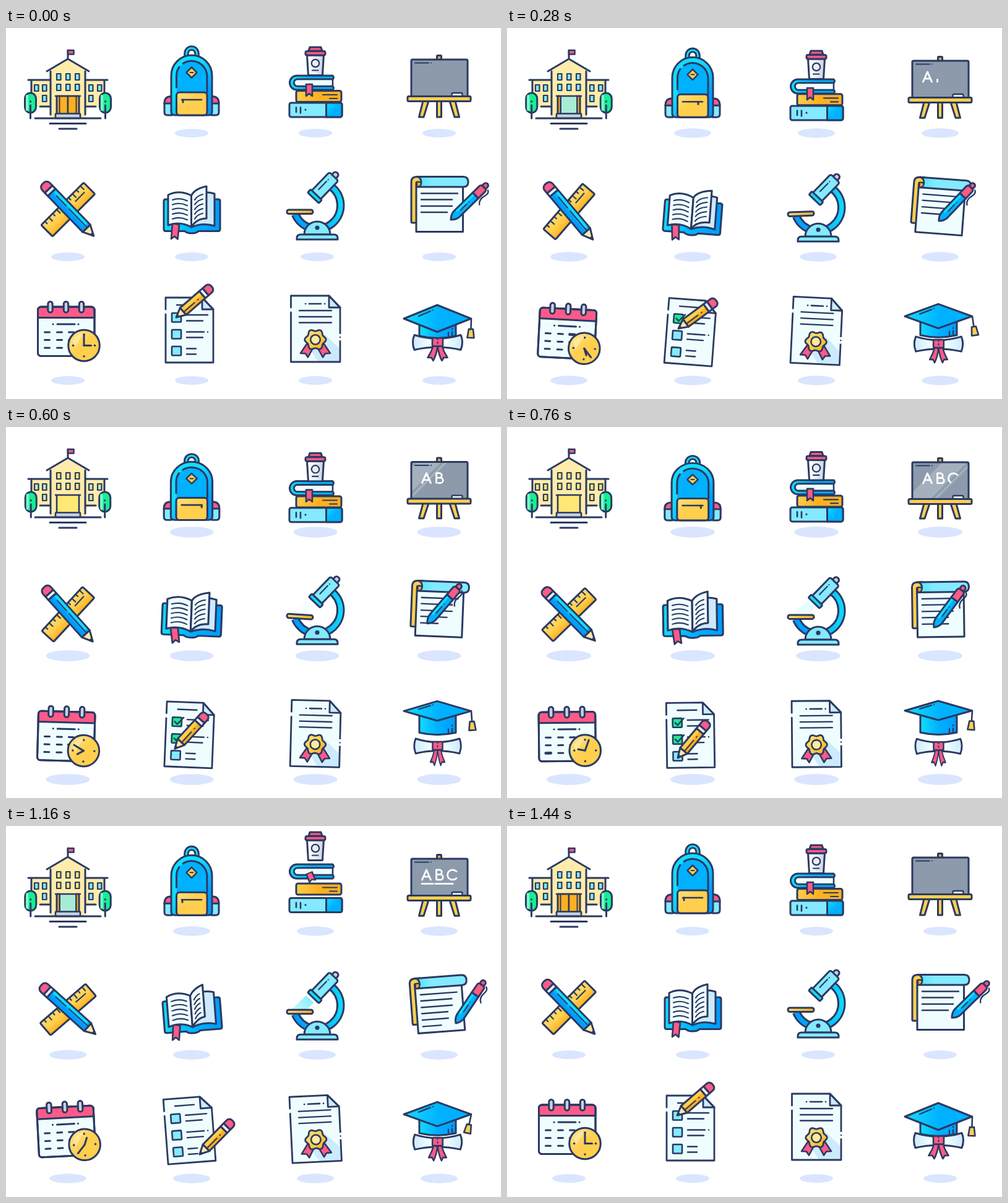
These frames come from a looping animation (800 by 600 pixels, 1.48 s). An HTML page with a canvas:

```html
<!DOCTYPE html>
<html lang="en">
<meta charset="utf-8">
<title>School icons</title>
<style>
  html, body { margin: 0; width: 100%; height: 100%; overflow: hidden; background: #fff; }
  canvas { display: block; }
</style>
<canvas width="800" height="600"></canvas>
<script>
const c = document.querySelector('canvas').getContext('2d');
const INK = '#2b3a62', BLUE = '#00b1ff', DEEP = '#009cff', CYAN = '#12dcff', ICE = '#84eaff',
  PAPER = '#f0fdff', SHADE = '#cdeafd', PINK = '#ff5a87', GOLD = '#ffcf4d', ORANGE = '#ffb020',
  CREAM = '#ffecaa', GREY = '#c7d2e0', PALE = '#e9eef7', GREEN = '#16ee95';
const LOOP = 1480, CYCLE = 1440, TIMES = [0, 280, 440, 760, 1000, 1160, CYCLE];
let t, u, s; // time, bob 0..1, sway -1..1

const clamp = x => Math.max(0, Math.min(1, x));
const ramp = (a, b) => clamp((t - a) / (b - a));

// Smooth periodic curve through one value per entry of TIMES
function key(...v) {
  const n = v.length, at = i => TIMES[(i + n) % n] + CYCLE * Math.floor(i / n), val = i => v[(i + n) % n];
  const slope = i => (val(i + 1) - val(i - 1)) / (at(i + 1) - at(i - 1));
  let i = n - 1;
  while (TIMES[i] > t) i--;
  const h = at(i + 1) - at(i), x = (t - at(i)) / h, y = 1 - x;
  return val(i) * y * y * (1 + 2 * x) + val(i + 1) * x * x * (3 - 2 * x)
    + h * x * y * (slope(i) * y - slope(i + 1) * x);
}

function draw(p, fill, width = 3, color = INK) {
  if (typeof p === 'string') p = new Path2D(p);
  if (fill) { c.fillStyle = fill; c.fill(p); }
  if (width) { c.lineWidth = width; c.strokeStyle = color; c.stroke(p); }
}
const line = (d, width = 3, color) => draw(d, null, width, color);
const flat = (d, fill) => draw(d, fill, 0);
function box(x, y, w, h, r, fill, width) {
  const p = new Path2D();
  p.roundRect(x, y, w, h, r);
  draw(p, fill, width);
}
function disc(x, y, r, fill, width = 0) {
  const p = new Path2D();
  p.arc(x, y, r, 0, 7);
  draw(p, fill, width);
}
function blend(x1, y1, x2, y2, ...colors) {
  const g = c.createLinearGradient(x1, y1, x2, y2);
  colors.forEach((col, i) => g.addColorStop(i / (colors.length - 1), col));
  return g;
}
function place(x, y, deg, fn, sx = 1, sy = 1) {
  c.save();
  c.translate(x, y);
  c.rotate(deg * Math.PI / 180);
  c.scale(sx, sy);
  fn();
  c.restore();
}
// Moves a drawing made in stage coordinates around its pivot
const pose = (x, y, dy, deg, fn, sx, sy) =>
  place(x, y + dy, deg, () => { c.translate(-x, -y); fn(); }, sx, sy);
function fade(a, fn) {
  c.save();
  c.globalAlpha = clamp(a);
  fn();
  c.restore();
}
function shadow(x, y) {
  c.fillStyle = '#dae5ff';
  c.beginPath();
  c.ellipse(x, y, 27 + 9 * u, 7 + 2 * u, 0, 0, 7);
  c.fill();
}

// Tip at the origin, body along +x
function pencil(len, h, body, light) {
  const tip = h * 2;
  draw(`M0 0L${tip} ${-h}V${h}Z`, '#ffe9a6');
  flat(`M0 0L${tip * .35} ${-h * .35}V${h * .35}Z`, INK);
  box(tip, -h, len - tip - 20, h * 2, 0, body, 0);
  box(tip, -h, len - tip - 20, h * .9, 0, light, 0);
  line(`M${tip + 2} ${h * .2}H${len * .5}M${len * .5 + 7} ${h * .2}H${len - 30}`, 2);
  box(tip, -h, len - tip - 20, h * 2, 0);
  box(len - 20, -h, 7, h * 2, 0, PALE);
  box(len - 13, -h, 13, h * 2, [0, h * .8, h * .8, 0], PINK);
}

function school() {
  const night = key(0, 0, 1, 1, 1, 1), late = key(0, 0, 0, 1, 1, 0), YELLOW = '#ffe873';
  const panes = (lit, list) => list.forEach(([x, y]) => {
    box(x, y, 6.5, 10, 0, ICE, 0);
    fade(lit, () => box(x, y, 6.5, 10, 0, YELLOW, 0));
    box(x, y, 6.5, 10, 0, null, 2.2);
  });
  flat('M42 84H158V127H42Z', CREAM);
  flat('M72 68L100 52L128 68V146H72Z', CREAM);
  line('M41 103V84M36 84H71M129 84H164M159 84V103M55 127H71M129 127H145M72 70V140M128 70V140');
  line('M66 70L100 50L134 70M100 49V36');
  box(100, 36, 9.5, 6.5, 0, PINK, 2.5);
  panes(night, [82, 97, 112].flatMap(x => [[x, 74], [x, 91]]));
  panes(late, [[46, 92], [59, 92], [59, 109], [134, 92], [148, 92], [134, 109]]);
  box(82, 110, 36, 29, 0, '#a8ebd5', 0);
  fade(key(0, 0, 1, 1, 1, 0), () => box(82, 110, 36, 29, 0, YELLOW, 0));
  const leaf = 14 * clamp(1 - key(0, .95, 1, 1, 1, .95));
  if (leaf > .3) {
    const w = leaf + 4;
    box(82, 110, w, 29, 0, ORANGE, 2.5);
    box(118 - w, 110, w, 29, 0, ORANGE, 2.5);
    if (leaf > 5) line('M86.5 111V138M113.5 111V138', 2);
  }
  line('M82 138V110H118V138M80 110H120', 2.6);
  box(80, 138.5, 40, 7.5, 1, GREY, 2.6);
  line('M47 146H153M71 154.5H129M86 163H114');
  for (const side of [-1, 1]) place(100 + side * (60.5 - .8 * u), 0, 0, () => {
    box(-9, 105, 18, 32, 9, GREEN);
    box(-7.5, 108, 4, 26, 2, '#7bffc8', 0);
    line('M0 118.5V119M0 125V146');
  });
}

function backpack() {
  const sy = key(1, 1, 1, .955, 1.055, 1);
  pose(300, 142, 10 * u, 0, () => {
    place(0, key(0, 0, 0, 2, -1, 0), 0, () => {
      const handle = 'M291.5 49V41A8.5 8.5 0 0 1 308.5 41V49';
      line(handle, 8.5);
      line(handle, 2.8, CYAN);
    });
    for (const side of [-1, 1]) place(300, 0, 0, () => {
      draw('M-32 111H-36Q-44 112 -44 122V136Q-44 141 -39 141H-32Z', ICE);
      draw('M-32 111H-36Q-44 112 -44 122H-32Z', PINK);
    }, -side, 1);
    draw('M267 135V77A33 33 0 0 1 333 77V135Q333 141 327 141H273Q267 141 267 135Z',
      blend(267, 50, 333, 100, CYAN, CYAN, DEEP));
    flat('M276 140V78A24.5 24.5 0 0 1 325 78V140Z', BLUE);
    line('M275.5 96V78Q275.5 69 280 63M286 57.5A25 25 0 0 1 325 78V104');
    draw('M300 63.5L308.5 72L300 80.5L291.5 72Z', GOLD, 2.5);
    line('M297.5 72H302.5', 2);
    box(275.5, 104, 49.5, 37, 5, blend(280, 105, 300, 141, '#ffe07c', GOLD, GOLD));
    line('M284 116H316', 2.6);
    line(`M${key(286, 309, 315, 313, 292, 285)} 116v4`);
  }, 1 + (1 - sy) * .6, sy);
}

function books() {
  const y = 10 * u;
  const lift = (...v) => key(...v) + y;
  place(0, lift(0, 1.7, 1, -1, -7.7, -7.8), 0, () => {
    box(458, 121, 85, 23, 3, ICE);
    box(517.5, 121, 25.5, 23, [0, 3, 3, 0], blend(518, 121, 543, 144, CYAN, BLUE, BLUE));
    line('M469 128.5V136M476 128.5V137.5', 2.6);
    line('M484 132V132.3');
  });
  place(0, lift(0, 2, 1.3, -.5, -12.2, -11.8), 0, () => {
    box(469, 101.5, 73, 18, 3, blend(469, 102, 542, 119, GOLD, ORANGE, ORANGE));
    line('M512 108H535M523 114H535', 2.2);
  });
  place(0, lift(0, 2.7, 1.3, -1, -18.7, -18.3), 0, () => {
    draw('M528 77H470A11.5 11.5 0 0 0 470 100H528Q531 97 528 94H471A5.5 5.5 0 0 1 471 83H528Q531 80 528 77Z',
      blend(460, 0, 530, 0, CYAN, BLUE, BLUE));
    draw('M528 83H471A5.5 5.5 0 0 0 471 94H528Z', PAPER, 2.6);
    place(490, 91, key(0, 0, 0, 0, 0, -22), () =>
      draw('M-5 0V19L0 15L5 19V0Z', PINK, 2.6), 1, key(1, 1, 1, 1, .85, .75));
  });
  place(0, lift(0, 2.7, 1.3, -.5, -24.7, -24.3), 0, () => {
    draw('M486.5 44H513.5L511.5 76.5H488.5Z', blend(487, 0, 513, 0, '#fff', PALE, GREY));
    draw('M491 31H509L511 37H489Z', PINK);
    box(484, 37.5, 32, 6.5, 2.5, PINK);
    disc(500, 57, 6.2, PALE, 2.2);
    line('M495 68.5H504.5', 2.2);
  });
}

function trace(d, len, a, b) {
  const k = ramp(a, b);
  if (!k) return;
  c.setLineDash([len * k, 999]);
  line(d, 2.8, '#fff');
  c.setLineDash([]);
}

function board() {
  place(0, 6 * u, 0, () => {
    const leg = 144 - 2 * u;
    for (const k of [-1, 1])
      draw(`M${700 + k * 17} 118H${700 + k * 26}L${700 + k * 32.5} ${leg}H${700 + k * 25}Z`, GOLD);
    box(696.5, 118, 7, leg - 118, 0, GOLD);
    box(696.5, 44.5, 7, 8, 1, ORANGE);
    box(655, 51, 91, 60, 2, '#8c9aab', 0);
    c.save();
    c.beginPath();
    c.rect(655, 51, 91, 60);
    c.clip();
    const d = 700 + (t - 440) * .25;
    if (t > 240 && t < 1200) for (const [a, b] of [[-25, 15], [20, 25]])
      flat(`M${d + a - 51} 51H${d + b - 51}L${d + b - 111} 111H${d + a - 111}Z`, '#ffffff38');
    c.restore();
    line('M661 56.5H683M687 56.5V56.6', 2);
    fade(1 - ramp(1200, 1400), () => {
      trace('M672.5 85L679.5 69L686.5 85M675 80H684', 36, 80, 260);
      trace('M695.5 85V69H700.5A3.75 3.75 0 0 1 700.5 76.5H695.5H702A4.25 4.25 0 0 1 702 85H695.5', 64, 260, 620);
      trace('M728 71.5Q725 69 721.5 69A8 8 0 0 0 721.5 85Q725.5 85 728 82.5', 39, 620, 820);
      trace('M672 91.5H690', 18, 820, 900);
      trace('M693.5 91.5H722', 29, 900, 1000);
    });
    box(655, 51, 91, 60, 2);
    box(720.5, 105, 17, 6, 2, PALE, 2.4);
    box(649, 110.5, 102, 8, 2, GOLD);
  });
}

function tools() {
  place(100.3, 293.6 + 10 * u, -45 - 4.4 * s, () => {
    box(-48.5, -13, 97, 26, 2, blend(0, -13, 0, 13, '#ffdc70', GOLD, ORANGE));
    for (let i = 0; i < 10; i++) line(`M${i * 9 - 40} -13v${i % 2 ? 8 : 5}`, 2.2);
    line('M18 -1H38', 2.2);
  });
  place(101.5, 294.5 + 10 * u, 226 + 4.2 * s, () => {
    c.translate(-58, 0);
    pencil(118, 8.5, BLUE, DEEP);
    box(22, 3, 73, 4, 0, CYAN, 0);
  });
}

function openBook() {
  pose(300, 295, 10 * u, 4.7 * s, () => {
    draw('M258 277H343Q346 277 346 280V325Q346 328.5 343 328.5H311Q308 332 300 332Q292 332 289 328.5H258Q255 328.5 255 325V280Q255 277 258 277Z',
      blend(255, 0, 346, 0, CYAN, BLUE, DEEP));
    place(274.5, 318, key(0, -10, -12, -12, -2, 2), () =>
      draw('M-5.5 -2L-7.5 23L-2 19L3 23.5L5.5 0Z', PINK, 2.6));
    draw('M300 272Q318 262 337 268V320Q318 314 300 322Z', SHADE);
    draw('M262 270Q280 261 299.5 271V322Q281 312 262 319Z', PAPER);
    for (let i = 0; i < 5; i++) line(`M269 ${278 + i * 7.7}q12 -4.5 24 1.5`, 2.1);
    const x = 324 + 4 * s, y = 256 + 1.5 * s;
    draw(`M299.5 271Q305 260 ${x} ${y}V${y + 52}Q308 308 299.5 322Z`, PAPER);
    for (let i = 0; i < 5; i++) line(`M305 ${278 + i * 7.7}q4 -7 ${x - 311} -9`, 2.1);
  }, 1 + .06 * u, 1 - .02 * u);
}

function microscope() {
  place(0, 10 * u, 0, () => {
    fade(key(0, 0, 0, .25, 1, 1), () =>
      flat('M485 271L497 282L486 295H460Z', blend(490, 275, 472, 297, '#8aefff', '#c9f7ff')));
    const arm = 'M524.5 255.7A38 38 0 1 1 467.5 301';
    c.lineCap = 'butt';
    line(arm, 13.5);
    line(arm, 7.5, blend(465, 0, 547, 0, DEEP, BLUE, CYAN));
    c.lineCap = 'round';
    place(475, 297.2, key(0, -2, 6, 0, 0, 0), () =>
      box(-21, -3.2, 42, 6.5, 3, blend(-21, 0, 21, 0, '#ffdd74', ORANGE)));
    draw('M482 334A21 21 0 0 1 524 334Z', ICE);
    disc(503, 323, 3.6, INK);
    draw('M470 342V340Q470 334 476 334H530Q536 334 536 340V342Z', ICE);
    place(516 + key(0, .5, 4, -.5, 0, 0), 254.5 - key(0, 0, 1, 0, 0, 0), -46, () => {
      box(18, -4.5, 10, 9, [0, 4, 4, 0], GREY);
      box(-22, -10, 42, 20, 3, ICE);
      box(-28, -12.5, 7, 25, 2, CYAN);
      line('M-12 -3H6M10 -3H10.1', 2.2);
    });
  });
}

function notepad() {
  pose(700, 285, 10 * u, 4.6 * s, () => {
    draw('M655 314V249Q655 240.5 664 240.5H672V314Q672 315 670 315H656Z', GOLD);
    draw('M663 250H738.5V329.5H663Z', PAPER);
    draw('M664 240.5H739Q747 240.5 747 249Q747 257 739 257H664Q672 254 671 248Q670 241 664 240.5Z',
      blend(664, 0, 690, 0, '#4fe2ff', ICE));
    draw('M664 257V249Q671 248 671 252Q670 257 664 257Z', ORANGE, 2.4);
    line('M671 267.5H730M671 277.5H721M671 288H721M671 298H713', 2.4);
    const wipe = 1 - ramp(1200, 1400);
    const row = (y, w, a, b) => fade(wipe, () => { if (t > a) line(`M671 ${y}H${671 + w * ramp(a, b)}`, 2.4); });
    row(308.5, 42, 400, 700);
    row(319, 30, 760, 960);
  });
  place(key(719, 698, 677, 690, 702, 727), key(310, 312, 311, 324, 323, 319),
    key(-44.5, -46.4, -46, -53.5, -59.5, -56), () => {
      line('M76 8Q74 13 66 11Q55 8 50 15', 2.4);
      draw('M0 0Q6 -6 13 -6.5H56V6.5H13Q6 6 0 0Z', BLUE);
      box(16, -5, 38, 3.5, 0, CYAN, 0);
      line('M22 0H36M41 0H41.1', 2);
      box(56, -6.5, 19, 13, [0, 4, 4, 0], PINK);
      box(75, -4, 8, 8, [0, 4, 4, 0], PINK);
    });
}

function calendar() {
  pose(97, 490, 10 * u, 3.1 * s, () => {
    box(51.5, 451, 91.5, 79.5, 5, PAPER);
    flat('M120 530L143 495V530Z', SHADE);
    box(51.5, 451, 91.5, 17.5, [5, 5, 0, 0], PINK);
    box(51.5, 451, 91.5, 79.5, 5);
    for (const x of [71.5, 97, 122]) box(x - 3.7, 442.5, 7.4, 17.5, 3.7, GREY);
    line('M76 479H76.1M83 479H111M117 479H117.1');
    for (let i = 0; i < 9; i++) {
      const x = [62.5, 82.5, 101.5][i % 3], y = 492 + Math.floor(i / 3) * 12.6;
      line(`M${x} ${y}h8`, t >= 115 && Math.floor(t / 115) === i ? 4.6 : 3);
    }
    disc(126, 513.5, 25.3, blend(108, 495, 143, 532, '#ffe08a', GOLD, GOLD), 3);
    flat('M108 505A19 19 0 0 1 125 494L112 516Z', '#fff1ad99');
    for (let a = 0; a < 4; a++) place(126, 513.5, a * 90, () => line('M0 -17.5V-17.4', 3.4));
    const hand = (deg, len) => place(126, 513.5, deg, () => line(`M0 0V${-len}`));
    hand(t / 2, 18);
    hand(90 + t / 4, 11.5);
  });
}

// Fills a page and returns a function that draws its fold and broken outline
function sheet(x, y, w, h) {
  const r = x + w, fold = 18;
  flat(`M${x} ${y}H${r - fold}L${r} ${y + fold + 1}V${y + h}H${x}Z`, PAPER);
  return () => {
    draw(`M${r - fold} ${y}V${y + fold + 1}H${r}Z`, SHADE, 2.8);
    line(`M${x} ${y + 19}V${y}H${r - fold}L${r} ${y + fold + 1}V${y + h}H${x}V${y + 27}`, 2.8);
  };
}

function checklist() {
  pose(296.5, 488, 10 * u, 4.6 * s, () => {
    sheet(258, 436, 77, 105)();
    line('M276 448H307M292 464H326M292 473.5H318M292 491.5H320M326 491.5V491.6M292 500.5H318M292 518.5H307M292 527.5H307', 2.4);
    [200, 400, 760].forEach((on, i) => {
      const y = 461 + i * 27, a = ramp(on, on + 80) * (1 - ramp(1040, 1160));
      box(268, y, 15, 14.5, 1, ICE, 0);
      fade(a, () => box(268, y, 15, 14.5, 1, GREEN, 0));
      box(268, y, 15, 14.5, 1, null, 2.6);
      fade(a, () => line(`M272 ${y + 7}l4 4l10 -11`, 2.5));
    });
  });
  place(key(275, 277, 275, 276, 312, 313), key(468, 486, 502, 535, 534, 531),
    key(-41, -36.5, -43, -50, -44.5, -45.5), () => pencil(76, 7.5, ORANGE, GOLD));
}

function certificate() {
  pose(500, 487, 10 * u, 2.9 * s, () => {
    const edge = sheet(460.5, 433, 79.5, 107);
    flat('M512 492L540 519V540H505L486 512Z', SHADE);
    edge();
    line('M540 497V503', 5, '#fff');
    line('M540 500V500.1', 2.4, INK);
    line('M484 446H484.1M490 446H509M515 446H515.1', 2.6);
    line('M474 457H526M474 467H526M474 476.5H526', 2.3);
    for (const k of [-1, 1]) place(500, 504, 0, () =>
      draw('M-14 7L-24 22L-16 22.5L-12 28.5L-3 12Z', PINK, 2.6), k, 1);
    let d = '';
    for (let i = 0; i <= 72; i++) {
      const a = i * Math.PI / 36, r = 15.5 + 1.7 * Math.cos(6 * a);
      d += `${i ? 'L' : 'M'}${500 + r * Math.cos(a)} ${504 + r * Math.sin(a)}`;
    }
    draw(d + 'Z', blend(486, 490, 514, 518, '#ffe27f', GOLD, ORANGE), 2.8);
    disc(500, 504, 7.8, '#ffeaa0', 2.6);
  });
}

function graduation() {
  // The mortarboard flattens towards eye level as it rises
  const tilt = y => 448 - 5 * u + (y - 448) * (1 - .29 * u), mid = tilt(470), base = 499 - 4 * u;
  draw(`M668 ${mid + 5}V${base - 1}Q697 ${base + 6} 727 ${base - 1}V${mid + 5}Z`,
    blend(668, 0, 727, 0, CYAN, BLUE, DEEP));
  line(`M721 ${base - 13}v1M721 ${base - 8}v6M715 ${base - 7}v7`, 2.2);
  draw(`M643 ${mid}L697 ${tilt(448)}L751.5 ${mid}L697 ${tilt(491.5)}Z`,
    blend(645, 460, 700, 470, CYAN, BLUE));
  line(`M667 ${tilt(466)}L686 ${tilt(458)}M690 ${tilt(456.4)}h.1`, 2.2);
  place(752, mid, 2 - 11 * s, () => {
    line('M0 0V17', 2.6);
    draw('M-3.5 17H3.5L5.5 31H-5.5Z', GOLD, 2.6);
  });
  pose(697.5, 508, 8 * u, 0, () => {
    draw('M660 496.5Q697 508 735 496.5Q740 508 735 520.5Q697 512 660 520.5Q655 508 660 496.5Z',
      blend(658, 0, 737, 0, SHADE, PAPER, PAPER, SHADE));
    for (const k of [-1, 1]) place(697.5, 508, 0, () =>
      draw('M-7 6Q-10 16 -16 25L-10 25L-7 30Q-2 21 0 7Z', PINK, 2.6), k * (1 - .25 * u), 1 + .06 * u);
    box(689, 501.5, 17, 13, 1, PINK, 2.6);
    line('M697.5 503V504M697.5 508V510', 2);
  }, 1 - .06 * u, 1);
}

const icons = [school, backpack, books, board, tools, openBook, microscope, notepad,
  calendar, checklist, certificate, graduation];

function frame(now) {
  t = Math.floor(now % LOOP / 40) * 40;
  u = .5 - .5 * Math.cos(2 * Math.PI * t / CYCLE);
  s = Math.sin(2 * Math.PI * t / CYCLE);
  c.lineCap = c.lineJoin = 'round';
  c.fillStyle = '#fff';
  c.fillRect(0, 0, 800, 600);
  icons.forEach((icon, i) => {
    if (i) shadow(100 + i % 4 * 200 + (i === 6 ? 3 : 0), 170 + Math.floor(i / 4) * 200);
    icon();
  });
  requestAnimationFrame(frame);
}
requestAnimationFrame(frame);
</script>
</html>
```
